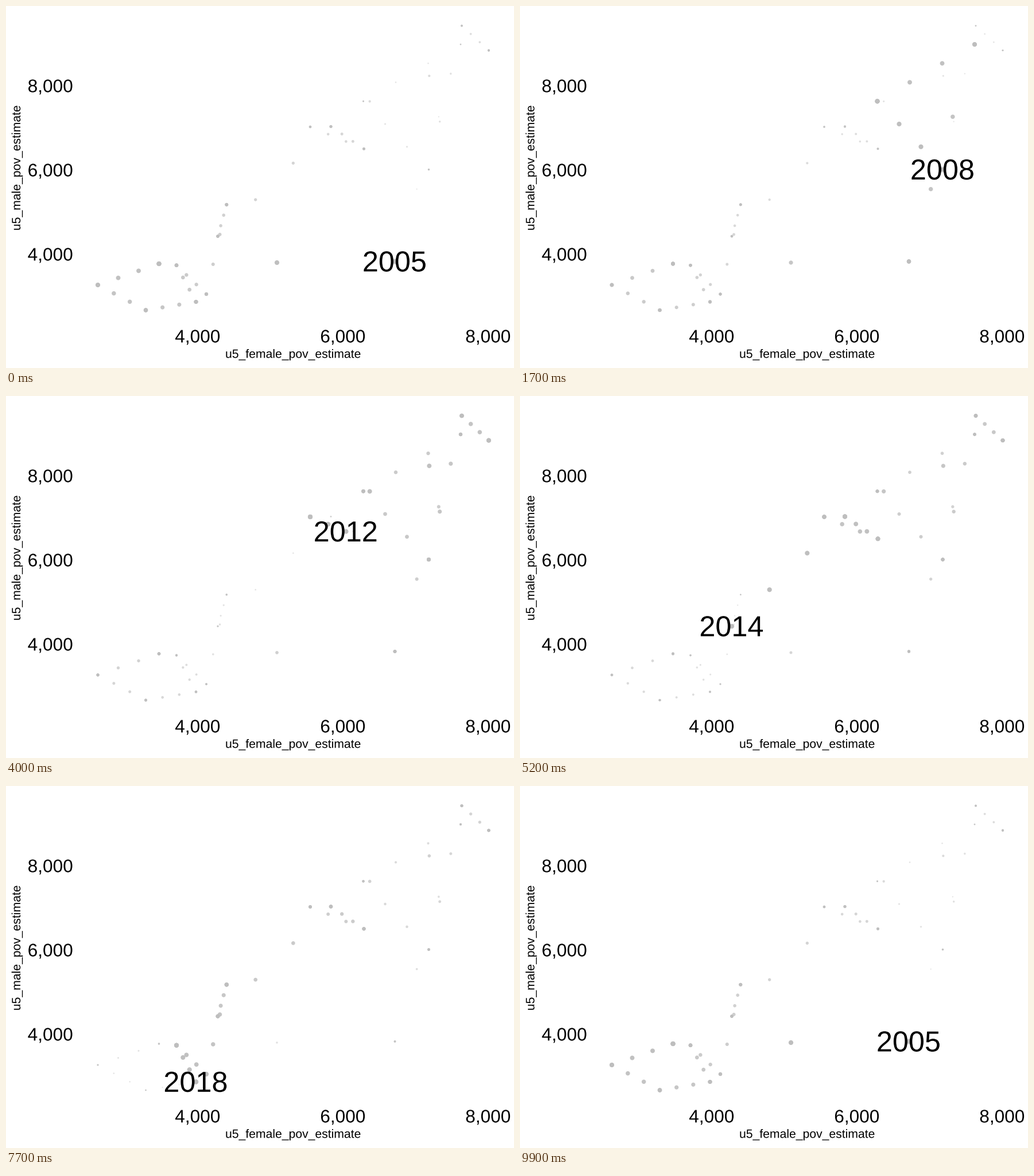
Write a matplotlib script that moves like this. It is 885 px wide and 632 px high and loops after 10 s.

```python
import numpy as np
import matplotlib.pyplot as plt
from matplotlib.animation import FuncAnimation
from matplotlib.patches import PathPatch, Rectangle
from matplotlib.textpath import TextPath
from matplotlib.transforms import Affine2D

W, H, DPI = 885, 632, 100
FRAMES, INTERVAL = 100, 100
PT = 72 / DPI  # points per pixel

plt.rcParams["font.family"] = "Liberation Sans"

YEARS = [*range(2005, 2020), 2021, 2022]
POINTS = np.array([
    (677.5, 446), (792, 67), (622.5, 166.3), (736.5, 285.5), (794, 34.5),
    (841, 77.5), (530, 211), (623.5, 249.3), (566, 210.5), (369, 402),
    (384.3, 346.8), (349, 503), (297, 452.7), (331, 516.5), (243.5, 531),
    (160, 487), (266.5, 450),
])
LABEL_SIZE, TICK_SIZE, TITLE_SIZE = 50.4, 31.6, 21.15


def build_track():
    """Position and year per frame: hold each state, then move linearly."""
    n = len(YEARS)
    arrivals = [i * FRAMES // n for i in range(n)] + [FRAMES - 1]
    track, years = np.zeros((FRAMES, 2)), [0] * FRAMES
    for i in range(n):
        j = (i + 1) % n
        steps = 2 if j == 0 else 3
        for k in range(arrivals[i], arrivals[i + 1] + 1):
            t = max(0, 1 - (arrivals[i + 1] - k) / steps)
            track[k] = POINTS[i] + (POINTS[j] - POINTS[i]) * t
            years[k] = YEARS[j] if t >= 0.5 else YEARS[i]
    return track, years


def number_path(text, x, y, size):
    """Outline of a number centred on (x, y) by its advance width."""
    width = sum(0.278 if c == "," else 0.556 for c in text) * size
    place = Affine2D().scale(1, -1).translate(x - width / 2, y + 0.345 * size)
    return place.transform_path(TextPath((0, 0), text, size=size))


def title_path(text, x, y, angle=0):
    """Outline of an axis title with the middle of its baseline on (x, y)."""
    path = TextPath((0, 0), text, size=TITLE_SIZE)
    box = path.get_extents()
    place = Affine2D().translate(-(box.x0 + box.x1) / 2, 0)
    place.scale(1, -1).rotate_deg(angle).translate(x, y)
    return place.transform_path(path)


def draw(path, **style):
    return ax.add_patch(PathPatch(path, facecolor="black", linewidth=0,
                                  snap=False, **style))


track, years = build_track()
ages = np.arange(FRAMES - 1, -1, -1)
fresh = 1 - ages / FRAMES
radii = 1.05 + 3.1 * fresh
colors = np.full((FRAMES, 4), 190 / 255)
colors[:, 3] = 0.32 + 0.68 * fresh

fig = plt.figure(figsize=(W / DPI, H / DPI), dpi=DPI, facecolor="white")
ax = fig.add_axes([0, 0, 1, 1])
ax.set_xlim(0, W)
ax.set_ylim(H, 0)
ax.axis("off")

for i, tick in enumerate(("4,000", "6,000", "8,000")):
    draw(number_path(tick, 333.8 + 253 * i, 576.5, TICK_SIZE))
    draw(number_path(tick, 77.2, 433.5 - 147 * i, TICK_SIZE))
draw(title_path("u5_female_pov_estimate", 500.4, 614.3))
draw(title_path("u5_male_pov_estimate", 25, 282.5, angle=-90))

panel = Rectangle((126, 9.6), 750, 546.4, transform=ax.transData)
dots = ax.scatter(track[:, 0], track[:, 1], s=(2 * radii * PT) ** 2,
                  c=colors, linewidths=0, zorder=2)
label = draw(number_path("2005", *POINTS[0], LABEL_SIZE), zorder=4)
label.set_clip_path(panel)


def update(frame):
    dots.set_offsets(track[(frame - ages) % FRAMES])
    x, y = track[frame]
    label.set_path(number_path(str(years[frame]), x - 0.6, y, LABEL_SIZE))
    return dots, label


anim = FuncAnimation(fig, update, frames=FRAMES, interval=INTERVAL,
                     repeat=True, repeat_delay=0, blit=False)
plt.show()
```
